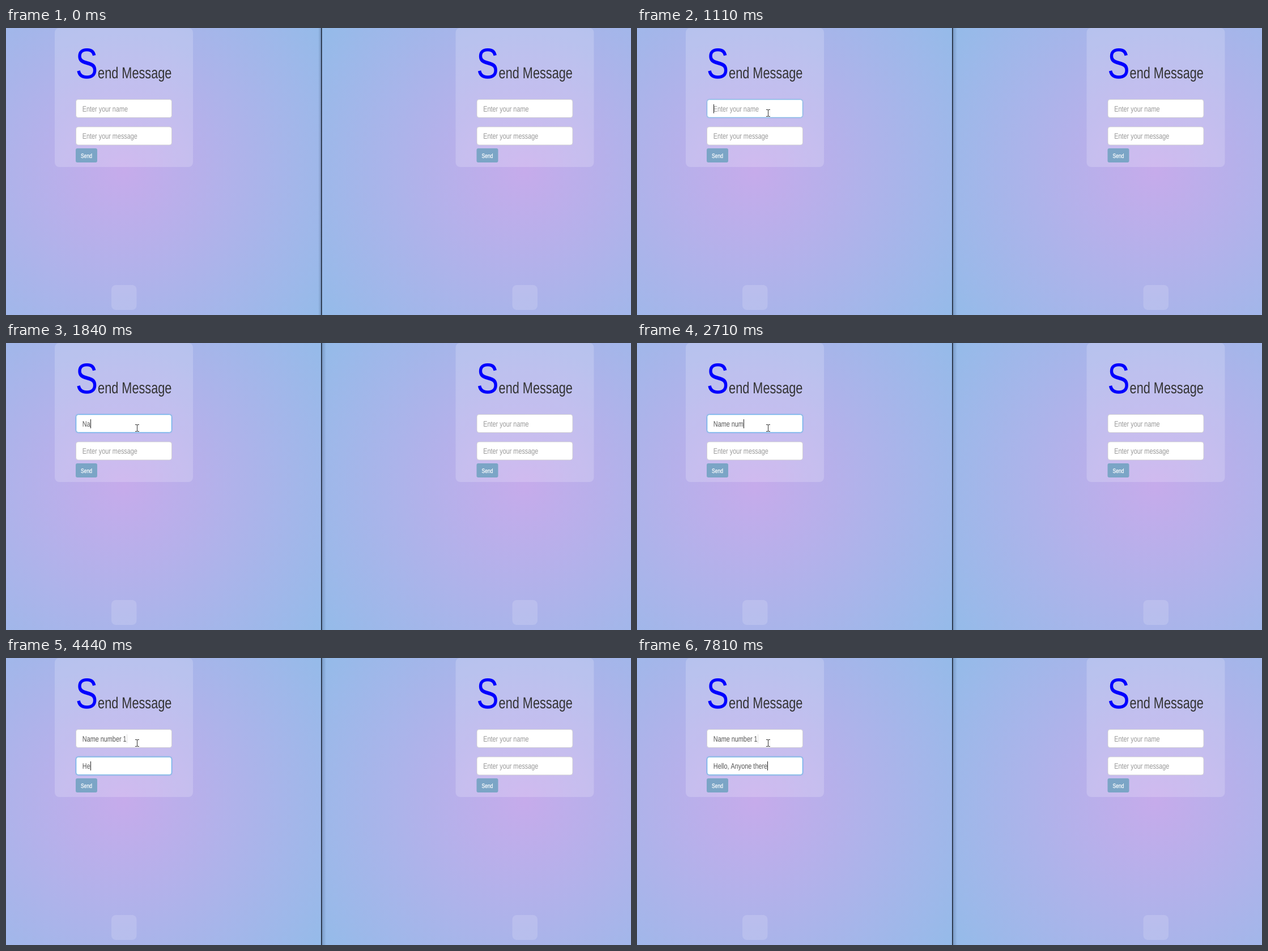
An HTML page that plays this animation: 1103 px wide and 508 px high, repeating every 8000 ms.

```html
<!DOCTYPE html>
<html lang="en">
<head>
<meta charset="utf-8">
<title>Send Message</title>
<style>
  html, body { margin: 0; width: 100%; height: 100%; overflow: hidden; }
  svg { display: block; width: 1103px; height: 508px; }
  text {
    font: 14px "Liberation Sans", Arial, sans-serif;
    text-rendering: geometricPrecision;
    white-space: pre;
  }
  .title { font-size: 28px; fill: #333; }
  .initial { font-size: 76px; fill: #00f; }
  .hint { fill: #999; }
  .typed { fill: #555; }
  .button { font-size: 11px; fill: #fff; stroke: #fff; stroke-width: .25; }
  .suggestion { font: 600 12px "Open Sans", sans-serif; fill: #444; }
  .glass { fill: #fff; fill-opacity: .18; }
  .faint { fill-opacity: .15; }
  .field { fill: #fff; stroke: #ccc; stroke-opacity: .8; }
  .ring { fill: none; stroke: #66afe9; filter: drop-shadow(0 0 1px rgba(102, 175, 233, .7)); }
  .caret { fill: #222; }
</style>
</head>
<body>
<svg viewBox="0 0 1103 508">
  <defs>
    <radialGradient id="sky" gradientUnits="userSpaceOnUse" cx="208" cy="254" r="440">
      <stop offset="0" stop-color="#c6abeb"/>
      <stop offset="1" stop-color="#94bbe9"/>
    </radialGradient>
    <linearGradient id="shade">
      <stop offset="0" stop-color="#203050" stop-opacity=".25"/>
      <stop offset="1" stop-color="#203050" stop-opacity="0"/>
    </linearGradient>
    <rect id="box" x="123.5" y="126.5" width="169" height="32" rx="4"/>

    <!-- The page is squeezed horizontally, so all lettering shares one scale. -->
    <g id="page">
      <rect x="-151" width="718" height="508" fill="url(#sky)"/>
      <rect class="glass" x="86" width="244" height="246" rx="8"/>
      <rect class="glass faint" x="186" y="455" width="44.500" height="44" rx="8"/>
      <g transform="translate(122.8 89) scale(.775 1)">
        <text class="title"><tspan class="initial">S</tspan>end Message</text>
      </g>
      <use href="#box" class="field"/>
      <use href="#box" class="field" y="48.5"/>
      <rect x="123" y="213" width="38" height="25" rx="3" fill="#7ba5c6"/>
      <g transform="translate(132 229.5) scale(.775 1)"><text class="button">Send</text></g>
    </g>
    <g id="nameHint" transform="translate(134.8 147.8) scale(.775 1)">
      <text class="hint">Enter your name</text>
    </g>
    <g id="messageHint" transform="translate(134.8 196.2) scale(.775 1)">
      <text class="hint">Enter your message</text>
    </g>
    <clipPath id="rightHalf"><rect x="557" width="546" height="508"/></clipPath>
  </defs>

  <use href="#page"/>
  <g clip-path="url(#rightHalf)">
    <g transform="translate(707.5)">
      <use href="#page"/>
      <use href="#nameHint"/>
      <use href="#messageHint"/>
    </g>
  </g>

  <use id="hint0" href="#nameHint"/>
  <use id="hint1" href="#messageHint"/>
  <use id="ring0" href="#box" class="ring"/>
  <use id="ring1" href="#box" class="ring" y="48.5"/>
  <g transform="translate(134.8 147.8) scale(.775 1)"><text id="text0" class="typed"></text></g>
  <g transform="translate(134.8 196.2) scale(.775 1)"><text id="text1" class="typed"></text></g>
  <rect id="ghost" x="213" y="135" width="1" height="16" fill="#ddd"/>
  <rect id="caret" class="caret" width="1" height="16"/>

  <g id="popup">
    <rect x="123" y="161" width="170.500" height="38.500" fill="#fff"
      style="filter: drop-shadow(0 1px 1px rgba(0, 0, 0, .35))"/>
    <g transform="translate(132 184) scale(.775 1)"><text class="suggestion">sds</text></g>
  </g>

  <rect id="shadowLeft" x="-556" width="5" height="508" fill="url(#shade)" transform="scale(-1 1)"/>
  <rect id="shadowRight" x="557" width="8" height="508" fill="url(#shade)"/>
  <rect x="556" width="1.600" height="508" fill="#1c2636"/>

  <g id="pointer">
    <path id="arrow" d="M0 0V15L3 12L5.500 17.500L7.500 16.500L5.300 11.300H9.500Z" fill="#fff" stroke="#111" stroke-width=".8"/>
    <path id="beam" d="M-3 -5.500H-1L.5 -5L2 -5.500H4M.5 -5V6M-3 6.500H-1L.5 6L2 6.500H4" fill="none" stroke="#333"/>
  </g>
</svg>
<script>
  const LOOP = 8000, TEXT_X = 134.8, SQUEEZE = .775;
  const FOCUS = 1010, TAB = 3570;
  const fields = [
    { text: "Name number 1",
      keys: [1710, 1840, 1930, 2020, 2110, 2380, 2510, 2710, 2840, 2940, 3040, 3140, 3240] },
    { text: "Hello, Anyone there",
      keys: [4240, 4440, 4570, 4700, 4830, 4960, 5950, 6220, 6310, 6410,
             6680, 6780, 6880, 7280, 7410, 7550, 7680, 7680, 7810] }
  ];
  const caretOff = [[1570, 1710], [4110, 4240], [5490, 5820]];

  const el = id => document.getElementById(id);
  const show = (id, on) => el(id).style.opacity = Number(on);
  const within = (t, a, b) => t >= a && t < b;
  const fade = (t, start) => Math.min(1, Math.max(0, (t - start + 20) / 160));

  function typeField(i, t) {
    const { text, keys } = fields[i];
    const count = keys.filter(k => k <= t).length;
    const typed = text.slice(0, count).replace(/ /g, "\u00a0");
    const node = el("text" + i);
    if (node.textContent !== typed) node.textContent = typed;
    show("hint" + i, !count);
    return count ? node.getComputedTextLength() * SQUEEZE : 0;
  }

  function movePointer(t) {
    const step = Math.floor((t - 260) / 75.5);
    const p = Math.min(1, Math.max(0, step / 9));
    const eased = p * p * (3 - 2 * p);
    const x = 1030 + (231 - 1030) * eased;
    const y = 250 + (150 - 250) * eased;
    const overField = x > 123 && x < 293 && y > 126 && y < 159;
    el("pointer").setAttribute("transform", `translate(${Math.round(x)} ${Math.round(y)})`);
    show("pointer", t >= 260);
    show("arrow", !overField);
    show("beam", overField);
  }

  function draw(t) {
    const widths = [typeField(0, t), typeField(1, t)];
    const active = t < TAB ? 0 : 1;
    const caret = el("caret");
    caret.setAttribute("x", Math.round(TEXT_X + widths[active]));
    caret.setAttribute("y", active ? 183 : 135);
    show("caret", t >= FOCUS && !caretOff.some(([a, b]) => within(t, a, b)));
    show("ghost", t >= TAB);

    const moved = t < TAB ? 0 : fade(t, TAB);
    show("ring0", t < FOCUS ? 0 : fade(t, FOCUS) - moved);
    show("ring1", moved);
    show("popup", within(t, 1710, 1840) ? (t < 1770 ? .85 : 1) : 0);
    show("shadowLeft", t < FOCUS);
    show("shadowRight", t >= FOCUS);
    movePointer(t);
  }

  let start;
  function tick(now) {
    start ??= now;
    draw((now - start) % LOOP);
    requestAnimationFrame(tick);
  }
  draw(0);
  requestAnimationFrame(tick);
</script>
</body>
</html>
```
